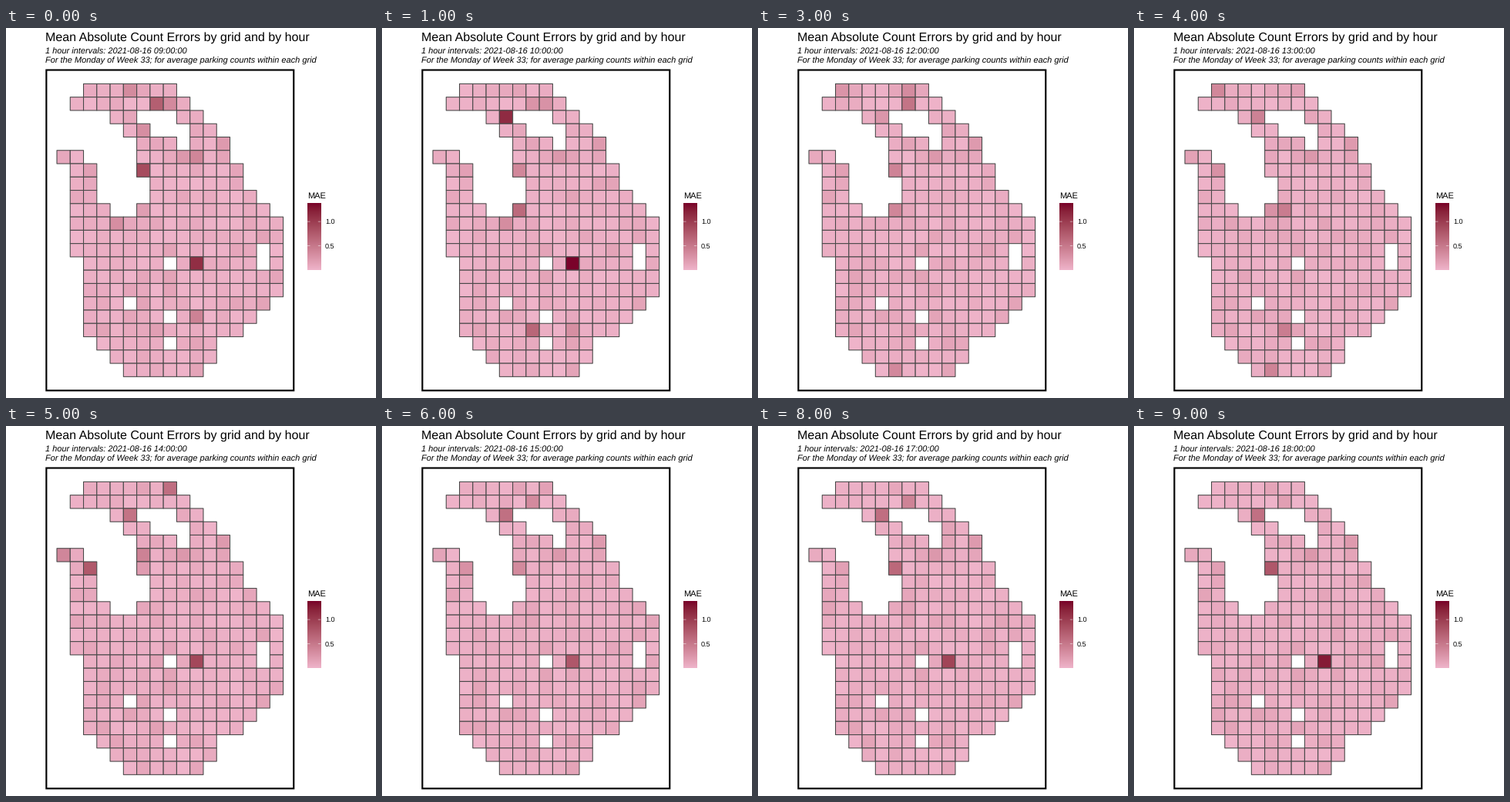
Recreate the animation shown at these times as a matplotlib script. Size 480 by 480 pixels, loop 10000 ms.

```python
import numpy as np
import matplotlib.pyplot as plt
from matplotlib.animation import FuncAnimation
from matplotlib.collections import PolyCollection
from matplotlib.patches import Rectangle

plt.rcParams["font.family"] = ["Liberation Sans", "DejaVu Sans"]
plt.rcParams["text.hinting"] = "none"
SIZE, DPI = 480, 100
PT = 72 / DPI  # points per pixel
X0, Y0, STEP = 66.0, 72.4, 17.27
FIRST_HOUR, HOURS = 9, 10
V_MIN, V_MAX = 0.005, 1.38

# Inclusive column spans of each grid row, top to bottom
ROWS = [
    "2-8", "1-9", "4-5 9-10", "5-6 10-11", "6-8 10-12", "0-1 6-12",
    "1-2 6-13", "1-2 7-13", "1-2 7-14", "1-3 6-15", "1-16", "1-16",
    "1-14 16-16", "2-7 9-14 16-16", "2-16", "2-16", "2-4 6-15",
    "2-7 9-14", "2-13", "3-7 9-11", "4-11", "5-10",
]

# Busiest cells: level through the day, linear between key hours
KEY_HOURS = [9, 10, 12, 13, 14, 16, 18]
DAILY = {
    (13, 10): [1.12, 1.37, .12, .05, .92, .64, 1.25],
    (6, 6): [.88, .38, .41, .05, .21, .50, .78],
    (2, 5): [.12, 1.14, .25, .42, .55, .60, .57],
    (1, 7): [.72, .27, .54, .05, .05, .65, .18],
}

# Short bursts elsewhere: row, column, peak hour, height
BURSTS = [
    (0, 5, 9, .3), (1, 8, 9.4, .45), (3, 6, 9, .3), (5, 10, 9, .3),
    (10, 4, 9, .3), (17, 10, 9, .3), (10, 5, 10, .3), (9, 6, 10, .55),
    (18, 7, 10, .55), (18, 10, 10, .3), (0, 7, 12, .3), (9, 6, 12.4, .4),
    (0, 2, 12.6, .43), (21, 6, 12.6, .43), (9, 7, 13, .4), (18, 7, 13, .4),
    (0, 8, 14, .5), (6, 2, 14, .6), (5, 6, 14, .4), (5, 0, 14, .3),
    (9, 7, 16, .48),
]
BURST_WIDTH = .8
STEADY = {(4, 12): .22, (5, 9): .24, (6, 2): .17}


def grid_cells():
    for r, spans in enumerate(ROWS):
        for span in spans.split():
            a, b = map(int, span.split("-"))
            for c in range(a, b + 1):
                yield r, c


CELLS = list(grid_cells())
INDEX = {cell: i for i, cell in enumerate(CELLS)}

# Colour ramp interpolated in CIE Lab
TO_XYZ = np.array([[.4124, .3576, .1805], [.2126, .7152, .0722],
                   [.0193, .1192, .9505]])
WHITE = TO_XYZ.sum(axis=1)
TO_LAB = np.array([[0, 116, 0], [500, -500, 0], [0, 200, -200]])


def rgb_to_lab(rgb):
    rgb = np.asarray(rgb) / 255
    lin = np.where(rgb > .04045, ((rgb + .055) / 1.055) ** 2.4, rgb / 12.92)
    t = TO_XYZ @ lin / WHITE
    f = np.where(t > .008856, np.cbrt(t), 7.787 * t + 16 / 116)
    return TO_LAB @ f - [16, 0, 0]


def lab_to_rgb(lab):
    f = (lab + [16, 0, 0]) @ np.linalg.inv(TO_LAB).T
    t = np.where(f > .2069, f ** 3, (f - 16 / 116) / 7.787)
    lin = np.clip((t * WHITE) @ np.linalg.inv(TO_XYZ).T, 0, 1)
    rgb = np.where(lin > .0031308, 1.055 * lin ** (1 / 2.4) - .055,
                   12.92 * lin)
    return np.clip(rgb, 0, 1)


LOW, HIGH = rgb_to_lab([239, 180, 202]), rgb_to_lab([121, 0, 41])


def shade(values):
    t = np.clip((np.asarray(values) - V_MIN) / (V_MAX - V_MIN), 0, 1)
    return lab_to_rgb(LOW + t[:, None] * (HIGH - LOW))


def errors(hour):
    base = np.random.default_rng(33).exponential(.03, len(CELLS))
    noise = np.random.default_rng(hour).exponential(.025, len(CELLS))
    vals = np.clip(base + noise, 0, .14)
    for cell, level in STEADY.items():
        vals[INDEX[cell]] = level
    for r, c, peak, height in BURSTS:
        vals[INDEX[r, c]] += height * np.exp(-((hour - peak) / BURST_WIDTH) ** 2)
    for cell, levels in DAILY.items():
        vals[INDEX[cell]] = np.interp(hour, KEY_HOURS, levels)
    return vals


def square(r, c):
    x, y = X0 + c * STEP, Y0 + r * STEP
    return [(x, y), (x + STEP, y), (x + STEP, y + STEP), (x, y + STEP)]


fig = plt.figure(figsize=(SIZE / DPI, SIZE / DPI), dpi=DPI, facecolor="white")
ax = fig.add_axes([0, 0, 1, 1])
ax.axis("off")


def label(x, y, text, px, **kw):
    return ax.text(x, y, text, fontsize=px * PT, va="baseline", **kw)


tiles = PolyCollection([square(r, c) for r, c in CELLS], snap=False,
                       edgecolors="#484848", linewidths=1.07 * PT)
ax.add_collection(tiles, autolim=False)
ax.add_patch(Rectangle((52.35, 54.5), 320.9, 415.8, fill=False, ec="black",
                       lw=2.13 * PT, joinstyle="miter", snap=False))

label(51.2, 17, "Mean Absolute Count Errors by grid and by hour", 16)
clock = label(51.2, 34, "", 11, style="italic")
label(51.2, 46, "For the Monday of Week 33; for average parking counts "
      "within each grid", 11, style="italic")

# Colour bar
BAR_L, BAR_R, BAR_T, BAR_B = 391, 408.3, 227.2, 313.6
ramp = shade(np.linspace(V_MAX, V_MIN, 256))[:, None, :]
ax.imshow(ramp, extent=(BAR_L, BAR_R, BAR_B, BAR_T), aspect="auto",
          interpolation="bilinear")
ax.set(xlim=(0, SIZE), ylim=(SIZE, 0))
label(391, 221, "MAE", 11)
for v in (.5, 1.0):
    y = BAR_B - (v - V_MIN) / (V_MAX - V_MIN) * (BAR_B - BAR_T)
    for x in (BAR_L, BAR_R - 3.46):
        ax.plot([x, x + 3.46], [y, y], color="white", lw=.5 * PT,
                solid_capstyle="butt", snap=False)
    label(414, y + 3, f"{v:.1f}", 9)


def update(i):
    hour = FIRST_HOUR + i
    tiles.set_facecolor(shade(errors(hour)))
    clock.set_text(f"1 hour intervals: 2021-08-16 {hour:02d}:00:00")
    return tiles, clock


anim = FuncAnimation(fig, update, frames=HOURS, interval=1000, repeat=True,
                     repeat_delay=0, blit=False)
plt.show()
```
